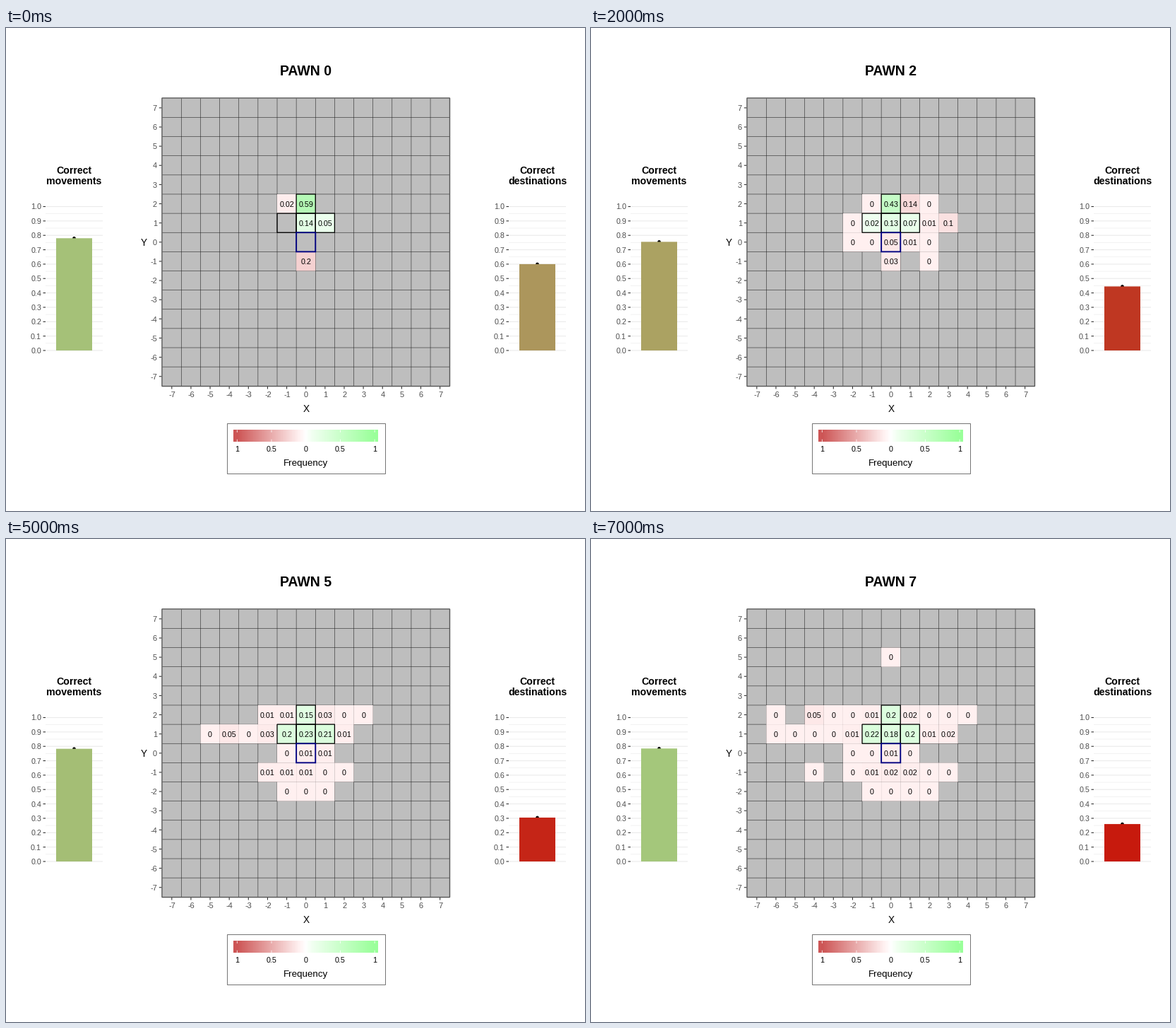
A matplotlib script that plays this animation: 820 by 683 pixels, repeating every 8000 ms.

```python
import matplotlib.pyplot as plt
import numpy as np
from matplotlib.animation import ArtistAnimation
from matplotlib.colors import LinearSegmentedColormap, to_rgb
from matplotlib.patches import Circle, Rectangle

W, H, DPI = 820, 683, 64
PT = 72 / DPI                      # points per pixel
X0, Y0, CELL = 424.7, 302.8, 27.13  # centre of the board
TOP, BASE = 252.5, 456.0           # bar chart scale, 1.0 and 0.0
GREY = "#4D4D4D"
TARGETS = [(0, 2), (-1, 1), (0, 1), (1, 1)]
NA = None

# Board rows per pawn: y -> (first x, values)
BOARDS = [
    {2: (-1, [.02, .59]), 1: (0, [.14, .05]), -1: (0, [.2])},
    {2: (0, [.18]), 1: (-4, [.11, NA, .01, .04, .61, .01]), 0: (0, [.03, 0])},
    {2: (-1, [0, .43, .14, 0]), 1: (-2, [0, .02, .13, .07, .01, .1]),
     0: (-2, [0, 0, .05, .01, 0]), -1: (0, [.03, NA, 0])},
    {2: (-1, [.02, .22, .08, 0]), 1: (-4, [.06, NA, .01, .12, .25, .1, .01, .03]),
     0: (-1, [.01, .03, .01, 0]), -1: (-1, [.01, .02, 0, 0]), -2: (0, [0])},
    {2: (-1, [.02, .05, .06, 0, NA, 0]),
     1: (-4, [.05, NA, .02, .24, .28, .2, .01, NA, .01]),
     0: (-1, [.01, .01, .01]), -1: (-1, [.01, .01, 0, 0]), -2: (-1, [0, 0, 0, 0])},
    {2: (-2, [.01, .01, .15, .03, 0, 0]), 1: (-5, [0, .05, 0, .03, .2, .23, .21, .01]),
     0: (-1, [0, .01, .01]), -1: (-2, [.01, .01, .01, 0, 0]), -2: (-1, [0, 0, 0])},
    {5: (-4, [0, NA, NA, NA, 0, 0]), 2: (-2, [.01, .01, .22, .02, 0, 0]),
     1: (-5, [0, .05, 0, .04, .16, .2, .21, .01]), 0: (-1, [0, .01, 0]),
     -1: (-2, [.01, .01, 0, .01, 0]), -2: (-1, [0, 0, 0])},
    {5: (0, [0]), 2: (-6, [0, NA, .05, 0, 0, .01, .2, .02, 0, 0, 0]),
     1: (-6, [0, 0, 0, 0, .01, .22, .18, .2, .01, .02]), 0: (-2, [0, 0, .01, 0]),
     -1: (-4, [0, NA, 0, .01, .02, .02, 0, 0]), -2: (-1, [0, 0, 0, 0])},
]

# (value, colour) for the two bar charts
MOVES = [(.78, "#A5C178"), (.81, "#A1D481"), (.755, "#ABA262"), (.77, "#A7B56C"),
         (.783, "#A4BE75"), (.783, "#A4BE75"), (.785, "#A4C77B"), (.785, "#A4C77B")]
DESTS = [(.60, "#AC965C"), (.55, "#B27D4C"), (.445, "#BF3722"), (.38, "#C2301E"),
         (.335, "#C4291A"), (.305, "#C52517"), (.28, "#C62214"), (.26, "#C71A0D")]

plt.rcParams["font.family"] = "Liberation Sans"
fig = plt.figure(figsize=(W / DPI, H / DPI), dpi=DPI, facecolor="white")
ax = fig.add_axes([0, 0, 1, 1])
ax.set_xlim(0, W)
ax.set_ylim(H, 0)
ax.axis("off")


def text(x, y, s, size, color="black", ha="center", bold=False, z=8):
    """Place text on the baseline y, size in pixels."""
    return ax.text(x, y, s, fontsize=size * PT, color=color, ha=ha, va="baseline",
                   fontweight="bold" if bold else "normal", zorder=z)


def line(x1, y1, x2, y2, width, color, z=2, snap=False):
    ax.plot([x1, x2], [y1, y2], lw=width * PT, color=color, zorder=z,
            solid_capstyle="butt", snap=snap)


def box(x, y, w, h, z, fill="none", edge="none", width=0.0, snap=False):
    return ax.add_patch(Rectangle((x, y), w, h, fc=fill, ec=edge, lw=width * PT,
                                  zorder=z, joinstyle="miter", snap=snap))


def cell_box(x, y, z, **style):
    return box(X0 + (x - .5) * CELL, Y0 - (y + .5) * CELL, CELL, CELL, z, **style)


def shade(x, y, v):
    ends = ("#F0FFF2", "#8CF58C") if (x, y) in TARGETS else ("#FFF0F0", "#CD5555")
    a, b = (np.array(to_rgb(c)) for c in ends)
    return tuple(a + (b - a) * v)


def draw_board():
    half = 7.5 * CELL
    box(X0 - half, Y0 - half, 2 * half, 2 * half, 1, fill="#BEBEBE")
    for k in range(-7, 8):
        x, y = X0 + k * CELL, Y0 - k * CELL
        if k < 7:
            gx, gy = x + CELL / 2, y - CELL / 2
            line(gx, Y0 - half, gx, Y0 + half, .55, "#222222")
            line(X0 - half, gy, X0 + half, gy, .55, "#222222")
        line(216.8, y, 220.5, y, 1.1, "#333333")
        line(x, 507, x, 510.5, 1.1, "#333333")
        text(214, y + 4.2, f"{k}", 11, GREY, ha="right")
        text(x + .4, 521.6, f"{k}", 11, GREY)
    box(X0 - half - .3, Y0 - half - .3, 2 * half + .6, 2 * half + .6, 7,
        edge="#555555", width=1.4)
    text(425, 543, "X", 13.6)
    text(195.5, 307.7, "Y", 13.6)
    for x, y in TARGETS:
        cell_box(x, y, 5, edge="black", width=1.3)
    cell_box(0, 0, 6, edge="#000080", width=1.9)


def draw_chart(left, title):
    mid = left + 40.5
    for i, word in enumerate(title):
        text(mid, 206 + 15 * i, word, 14.1, bold=True)
    for k in range(21):
        y = BASE + (TOP - BASE) * k / 20
        if k % 2:
            line(left, y, left + 81, y, .6, "#EBEBEB")
            continue
        line(left, y, left + 81, y, 1.1, "#EBEBEB")
        line(left - 3.5, y, left, y, 1.1, "#333333")
        text(left - 6, y + 4, f"{k / 20:.1f}", 10.7, GREY, ha="right")


def draw_legend():
    box(312.5, 559, 224, 70.5, 1, fill="white", edge="#666666", width=.9, snap=True)
    stops = [(0, "#CD5555"), (.024, "#CD5555"), (.45, "#FFF0F0"), (.5, "#FFFFFF"),
             (.55, "#F0FFF0"), (.976, "#9AFF9A"), (1, "#9AFF9A")]
    cmap = LinearSegmentedColormap.from_list("frequency", stops)
    ax.imshow(np.linspace(0, 1, 256)[None, :], cmap=cmap, aspect="auto",
              extent=(322, 527, 585, 568.5), zorder=2, interpolation="bilinear")
    ax.set_xlim(0, W)
    ax.set_ylim(H, 0)
    for k in range(-2, 3):
        x = X0 + k * 48.7
        line(x, 568.5, x, 571.8, .8, "white", 3)
        line(x, 581.7, x, 585, .8, "white", 3)
        text(x, 599.4, f"{abs(k) / 2:g}", 10.7)
    text(424.5, 619.2, "Frequency", 13.4)


def bar(left, value, color):
    top = BASE + (TOP - BASE) * value
    dot = ax.add_patch(Circle((left + 40.5, top), 2.3, fc="black", lw=0, zorder=3))
    return [dot, box(left + 15, top, 51, BASE - top, 4, fill=color)]


def pawn(n):
    """All artists that belong to one pawn."""
    parts = [text(424.7, 67.3, f"PAWN {n}", 19.5, bold=True)]
    for y, (start, values) in BOARDS[n].items():
        for x, v in enumerate(values, start):
            if v is not None:
                parts.append(cell_box(x, y, 4, fill=shade(x, y, v)))
                parts.append(text(X0 + x * CELL, Y0 - y * CELL + 4, f"{v:g}", 10.7))
    return parts + bar(56, *MOVES[n]) + bar(712, *DESTS[n])


draw_board()
draw_chart(56, ("Correct", "movements"))
draw_chart(712, ("Correct", "destinations"))
draw_legend()
anim = ArtistAnimation(fig, [pawn(n) for n in range(8)], interval=1000,
                       repeat=True, repeat_delay=0, blit=False)
plt.show()
```
